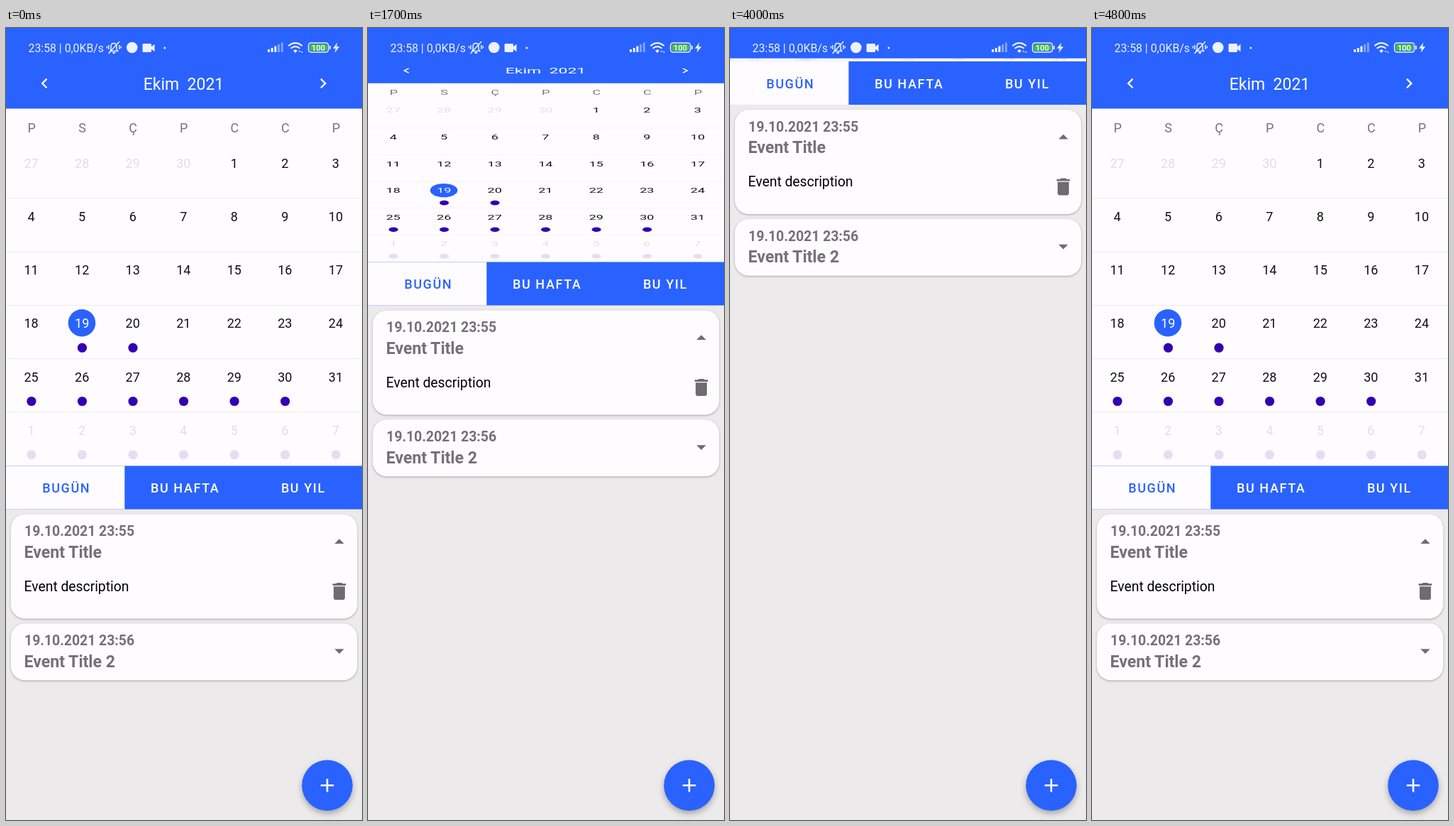
These frames come from a looping animation (502x1115 px, 4.9 s). An HTML page:

```html
<!DOCTYPE html>
<html lang="tr">
<head>
<meta charset="utf-8">
<title>Takvim</title>
<style>
  html, body { margin: 0; width: 100%; height: 100%; overflow: hidden; background: #eceaeb; }
  svg { display: block; width: 502px; height: 1115px; font-family: Roboto, sans-serif; }
  text { white-space: pre; }
  .blue { fill: #2962ff; }
  .paper { fill: #fefcff; }
  .mid { text-anchor: middle; }
  .tab { font-size: 18px; font-weight: 500; letter-spacing: 1.6px; text-anchor: middle; }
  .time { font-size: 19.4px; font-weight: 700; fill: #737173; }
  .title { font-size: 23.1px; font-weight: 700; fill: #737173; }
  .icon { fill: #6e6c6e; }
  .card { filter: drop-shadow(0 1.5px 1.5px rgba(0, 0, 0, .3)); }
  .fab { filter: drop-shadow(0 4px 4px rgba(0, 0, 0, .3)); }
</style>
</head>
<body>
<svg viewBox="0 0 502 1115">
  <defs><clipPath id="strip"><rect y="616.5" width="502" height="61"/></clipPath></defs>

  <g id="calendar">
    <rect class="paper" y="42" width="502" height="574.5"/>
    <rect class="blue" y="40" width="502" height="73.5"/>
    <text class="mid" x="250.5" y="87" font-size="23" fill="#fff">Ekim  2021</text>
    <g fill="#fff">
      <path transform="translate(40 63.7) scale(1.19)" d="M15.41 7.41 14 6l-6 6 6 6 1.41-1.41L10.83 12z"/>
      <path transform="translate(432.9 63.7) scale(1.19)" d="M10 6 8.59 7.41 13.17 12l-4.58 4.59L10 18l6-6z"/>
    </g>
    <g id="days" class="mid" font-size="18"></g>
  </g>

  <g id="panel">
    <rect y="616.5" width="502" height="1100" fill="#eceaeb"/>
    <rect class="blue" y="616.5" width="502" height="61"/>
    <g clip-path="url(#strip)"><circle id="ripple" cx="84" cy="647" r="89.2" fill="#fff"/></g>
    <rect class="paper" y="616.5" width="167.3" height="61"/>
    <text class="tab blue" x="85.2" y="654.4">BUGÜN</text>
    <text class="tab" x="252.6" y="654.4" fill="#fff">BU HAFTA</text>
    <text class="tab" x="419.4" y="654.4" fill="#fff">BU YIL</text>

    <rect class="paper card" x="6.7" y="684.5" width="488.6" height="147" rx="20"/>
    <text class="time" x="26" y="715.3">19.10.2021 23:55</text>
    <text class="title" x="25.6" y="745.6">Event Title</text>
    <text x="25.6" y="792.7" font-size="19.3">Event description</text>
    <path class="icon" d="M463.3 726h13.4l-6.7-6.7z"/>
    <path class="icon" transform="translate(454 777) scale(1.33)" d="M6 19c0 1.1.9 2 2 2h8c1.1 0 2-.9 2-2V7H6v12zM19 4h-3.5l-1-1h-5l-1 1H5v2h14V4z"/>

    <rect class="paper card" x="6.7" y="838.3" width="488.6" height="80" rx="20"/>
    <text class="time" x="26" y="869.3">19.10.2021 23:56</text>
    <text class="title" x="25.6" y="899.6">Event Title 2</text>
    <path class="icon" d="M463.3 874.3h13.4l-6.7 6.7z"/>
  </g>

  <g id="status">
    <rect class="blue" width="502" height="42.3"/>
    <g fill="#eef2ff">
      <text x="31.6" y="33.6" font-size="15.8">23:58 | 0,0KB/s</text>
      <circle cx="177.7" cy="27.5" r="7.8"/>
      <path d="M194 22h9.5a1.5 1.5 0 0 1 1.5 1.5v2.8l4.5-3.6v10.6l-4.5-3.6v2.8a1.5 1.5 0 0 1-1.5 1.5H194a1.5 1.5 0 0 1-1.5-1.5v-9a1.5 1.5 0 0 1 1.5-1.5z"/>
      <circle cx="223.8" cy="28" r="1.5"/>
      <path d="M369 34v-4h3v4zM373.7 34v-6h3v6zM378.4 34v-8.4h3V34z"/>
      <path opacity=".45" d="M383.1 34V23h3v11zM387.8 34V20.5h3V34z"/>
      <path d="M467.2 20.5 461 28.8h3.8l-1.2 6 6.6-8.5h-4z"/>
      <path d="M456 25h1.8v5H456zM150 34h4.4a2.2 2.2 0 0 1-4.4 0z"/>
      <path d="m405 31.8 3-1.6 3 1.6-3 3.4zM412.5 33.5l1.5-2 1.5 2zM415.8 33.3l1.5 2 1.5-2z"/>
    </g>
    <g fill="none" stroke="#eef2ff" stroke-width="1.5">
      <path d="M147 32.5h10.5l-1.5-2.5v-4c0-6-8-6-8 0v4zM160 19l-15.5 17M144.8 24v6M142.4 25.5v3M159.8 24v6M162.2 25.5v3"/>
      <path stroke-width="2.1" d="M398.3 25.2q9.7-8.2 19.4 0M401.6 28.8q6.4-5.2 12.8 0"/>
      <rect x="426.6" y="21" width="28" height="13" rx="3.5"/>
    </g>
    <rect x="428.6" y="23" width="24" height="9" rx="1.5" fill="#48bd4c"/>
    <text class="mid" x="440.5" y="31.6" font-size="11" font-weight="500" fill="#fff">100</text>
  </g>

  <circle class="blue fab" cx="453" cy="1066.3" r="35.8"/>
  <path d="M443.7 1066.3h18.6M453 1057v18.6" stroke="#fff" stroke-width="2.6"/>
</svg>
<script>
  const $ = id => document.getElementById(id);
  const LOOP = 4900, STEP = 100, DURATION = 600, TOP = 42, HEIGHT = 574;
  const COLLAPSE = 1400, EXPAND = 3966;

  function add(tag, attrs, text = '') {
    const node = document.createElementNS('http://www.w3.org/2000/svg', tag);
    for (const key in attrs) node.setAttribute(key, attrs[key]);
    node.textContent = text;
    $('days').append(node);
  }

  const columnX = i => 35.6 + 71.55 * i;

  [...'PSÇPCCP'].forEach((day, i) => add('text', { x: columnX(i) + .5, y: 146.5, fill: '#757476' }, day));

  for (let row = 0; row < 6; row++) {
    const y = 190.2 + 75.27 * row;
    add('rect', { x: 0, y: y + 49.2, width: 502, height: 1, fill: '#ebeaee' });
    for (let col = 0; col < 7; col++) {
      const x = columnX(col), n = row * 7 + col - 3;
      const outside = n < 1 || n > 31, selected = n === 19;
      const label = n < 1 ? n + 30 : n > 31 ? n - 31 : n;
      if (selected) add('circle', { cx: x - .2, cy: y - .8, r: 19.3, class: 'blue' });
      add('text', { x, y: y + 6.3, fill: selected ? '#fff' : outside ? '#e1dfe2' : '#111' }, label);
      if (n === 19 || n === 20 || n >= 25 && n !== 31)
        add('circle', { cx: x + .3, cy: y + 34.2, r: 6.6, fill: outside ? '#e3dff3' : '#3200b1' });
    }
  }

  // Accelerate, then decelerate, along half a cosine wave.
  function ease(t, start) {
    const p = Math.min(1, Math.max(0, (t - start) / DURATION));
    return (1 - Math.cos(Math.PI * p)) / 2;
  }

  function rippleAlpha(t) {
    const fade = start => t < start ? 0 : Math.max(0, .45 * (1 - (t - start) / 170));
    return Math.max(fade(1400), fade(4100));
  }

  const origin = performance.now();
  function draw(now) {
    const elapsed = Math.max(0, now - origin) + 20;
    const t = Math.floor(elapsed % LOOP / STEP) * STEP;
    const scale = 1 - ease(t, COLLAPSE) + ease(t, EXPAND);
    $('calendar').setAttribute('transform', `translate(0 ${TOP * (1 - scale)}) scale(1 ${scale})`);
    $('panel').setAttribute('transform', `translate(0 ${HEIGHT * (scale - 1)})`);
    $('ripple').setAttribute('opacity', rippleAlpha(t));
    requestAnimationFrame(draw);
  }
  draw(origin);
</script>
</body>
</html>
```
